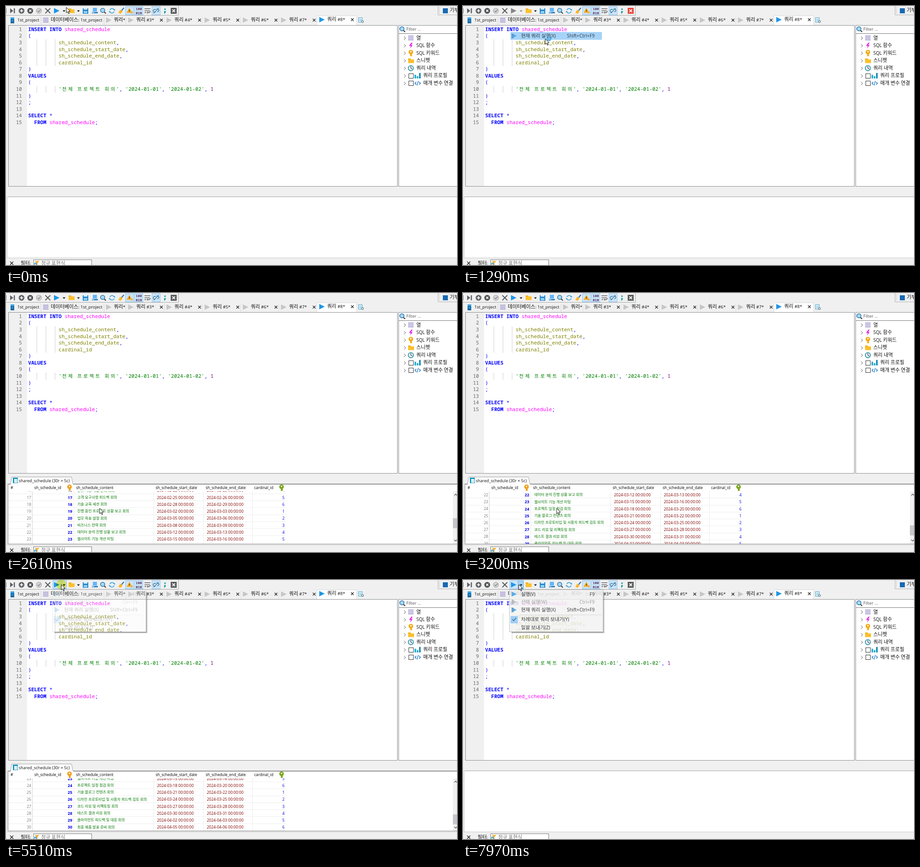
An HTML page with a canvas that plays this animation: 987 px wide and 568 px high, repeating every 8 s.

```html
<!DOCTYPE html>
<html lang="ko">
<head>
<meta charset="utf-8">
<title>SQL editor</title>
<style>
html, body { margin: 0; width: 100%; height: 100%; overflow: hidden; background: #f0f0f0; }
canvas { display: block; }
</style>
</head>
<body>
<canvas id="stage" width="987" height="568"></canvas>
<script>
const g = document.getElementById('stage').getContext('2d');
const LOOP = 8000;
const UI = '"Open Sans", "Noto Sans CJK KR", "Noto Sans CJK", sans-serif';
const HANGUL = '"Noto Sans CJK KR", "Noto Sans CJK", sans-serif';
const MONO = '"Noto Sans Mono", "DejaVu Sans Mono", monospace';
const BLUE = '#1e96e8', GRAY = '#5f6266', FACE = '#f0f0f0', YELLOW = '#fbc02d';

// ---------- drawing helpers ----------
function box(x, y, w, h, fill, stroke) {
  if (fill) { g.fillStyle = fill; g.fillRect(x, y, w, h); }
  if (stroke) { g.strokeStyle = stroke; g.lineWidth = 1; g.strokeRect(x + .5, y + .5, w - 1, h - 1); }
}
function trace(pts) {
  g.beginPath();
  for (let i = 0; i < pts.length; i += 2) g.lineTo(pts[i], pts[i + 1]);
}
function poly(pts, fill) { trace(pts); g.closePath(); g.fillStyle = fill; g.fill(); }
function line(pts, color, width = 1) {
  trace(pts); g.strokeStyle = color; g.lineWidth = width; g.stroke();
}
function disc(x, y, r, fill) { g.beginPath(); g.arc(x, y, r, 0, 7); g.fillStyle = fill; g.fill(); }
function ring(x, y, r, color, width, from = 0, to = 7) {
  g.beginPath(); g.arc(x, y, r, from, to); g.strokeStyle = color; g.lineWidth = width; g.stroke();
}
function cross(x, y, r, color, width) {
  line([x - r, y - r, x + r, y + r], color, width);
  line([x - r, y + r, x + r, y - r], color, width);
}
function play(x, y, color, r = 6) { poly([x - r, y - r, x + r, y, x - r, y + r], color); }
function drop(x, y, color) { poly([x - 3, y - 1.5, x + 3, y - 1.5, x, y + 2], color); }
function lens(x, y) {
  disc(x, y, 4.6, '#a9d8f5');
  ring(x, y, 4.6, '#2472a8', 1.5);
  line([x + 3.5, y + 3.5, x + 7, y + 7], '#333', 2);
}
function folder(x, y) {
  box(x - 6, y - 5, 6, 3, '#f5a800'); box(x - 6, y - 3, 13, 8, YELLOW);
}
function stack(x, y, color = '#b9b2dc') {
  for (let i = -1; i < 2; i++) box(x - 6, y + i * 4 - 1.5, 12, 3, color);
}
function key(x, y, color) {
  disc(x, y - 2, 5, color); box(x - 1.5, y, 4, 7, color);
  disc(x, y - 3, 1.6, '#fff');
}
// Hangul and Latin runs use slightly different sizes, as in the desktop UI.
function label(s, x, y, size = 9.5, color = '#111', align = 'left', ko = 10.9, weight = 400) {
  const runs = (s.match(/[가-힣]+|[^가-힣]+/g) || []).map(r =>
    [r, /[가-힣]/.test(r) ? `${weight} ${ko}px ${HANGUL}` : `${weight} ${size}px ${UI}`]);
  const width = ([r, f]) => { g.font = f; return g.measureText(r).width; };
  if (align === 'right') x -= runs.reduce((sum, r) => sum + width(r), 0);
  g.fillStyle = color;
  for (const r of runs) {
    const w = width(r);
    g.fillText(r[0], x, y + size * .36);
    x += w;
  }
}

// ---------- timing ----------
const clamp = v => Math.max(0, Math.min(1, v));
const ramp = (t, from, to) => clamp((t - from) / (to - from));
function track(keys, t, ease = v => v) {
  let a = keys[0];
  for (const b of keys) {
    if (b[0] > t) {
      const k = ease((t - a[0]) / (b[0] - a[0]));
      return a.slice(1).map((v, i) => v + (b[i + 1] - v) * k);
    }
    a = b;
  }
  return a.slice(1);
}
const smooth = v => v * v * (3 - 2 * v);
const pointer = [
  [0, 132, 3], [170, 132, 3], [250, 124, 11], [310, 125, 12], [490, 165, 81], [720, 165, 81],
  [990, 180, 72], [1600, 180, 72], [2010, 205, 472], [3640, 205, 472], [4140, 63, 33],
  [4400, 70, 32], [4460, 70, 32], [5240, 121, 10], [5680, 121, 10], [6000, 168, 68],
  [6270, 168, 68], [6490, 169, 249], [6710, 171, 256], [6890, 171, 256], [7670, 122, 9], [7700, 122, 10]
];
const scrolling = [[0, 0], [2040, 0], [2610, 238.5], [2680, 255], [2950, 255], [3260, 343]];
const menus = [[240, 1220], [5480, 6200], [7850, 9000]];
const runs = [1220, 6200];
const presses = [240, 1210, 5470, 6190, 7850];
const within = (t, a, b) => t >= a && t < b;

function stateAt(t) {
  const [x, y] = track(pointer, t, smooth);
  const run = runs.find(r => within(t, r, r + 520));
  const since = run === undefined ? -1 : t - run;
  const menu = menus.find(m => within(t, m[0], m[1]));
  const overPlay = x >= 102 && x < 132 && y < 21;
  return {
    x, y, since,
    menu: menu ? ramp(t, menu[0], menu[0] + 145) : 0,
    busy: within(since, 30, 200),
    press: presses.some(p => within(t, p, p + 75)),
    hot: !!menu || overPlay || within(since, 200, 480),
    rows: within(t, 1450, 6250),
    scroll: track(scrolling, Math.floor(t / 30) * 30)[0],
    caret: within(t, 1610, 5250) && Math.abs(Math.floor((t - 2130) / 520) % 2) === 1
  };
}

// ---------- toolbar ----------
function toolbar(s) {
  box(0, 0, 987, 42, FACE);
  line([0, 20.5, 377.5, 20.5, 377.5, 0], '#a8a8a8');
  box(0, 5, 1, 11, '#888');
  poly([9, 5, 16, 10.5, 9, 16], GRAY); box(17, 5, 2.5, 11, GRAY);
  disc(34, 10.5, 6.3, GRAY);
  line([30.5, 10.5, 37.5, 10.5], '#fff', 1.8); line([34, 7, 34, 14], '#fff', 1.8);
  disc(53, 10.5, 6.3, '#4c4f52'); cross(53, 10.5, 2.5, '#fff', 1.7);
  disc(72, 10.5, 6.3, '#a5a5a5'); disc(72, 10.5, 5.3, '#d6d6d6');
  line([69, 10.5, 71.5, 13, 75.5, 8], '#888', 1.6);
  cross(91.5, 10.5, 5.5, '#55585b', 2);

  if (s.hot) {
    box(102, 1, 31, 19, '#cce4f7', '#90c8f6');
    if (s.menu > .5) box(120, 1, 13, 19, '#a6d2f3', '#6cb3e8');
    else line([120.5, 1, 120.5, 20], '#90c8f6');
  }
  play(111, 10.5, s.busy ? '#858585' : BLUE);
  drop(127, 11, s.busy ? '#858585' : '#111');
  folder(143, 10.5); drop(158.5, 11, '#111');

  box(168, 5, 12, 12, '#2187c9'); box(170, 4, 8, 4, '#d6eefb'); box(170, 11, 8, 5, '#8fd0f3');
  box(190, 4, 9, 8, '#64b5f6'); box(188, 13, 13, 3, '#2d7fbd'); box(188, 12, 5, 3, '#9ad0f6');
  lens(211.5, 9.5);
  ring(232, 10.5, 5, '#259bdc', 1.5, .3, 2.8); ring(232, 10.5, 5, '#259bdc', 1.5, 3.5, 5.9);
  poly([225, 11, 229, 12, 226, 14.5], '#259bdc'); poly([239, 10, 235, 9, 238, 6.5], '#259bdc');
  line([258, 4, 253, 10], '#3b71a8', 2.4);
  poly([250, 8, 255, 12, 251, 17, 246, 15], '#f9b624');

  for (const x of [261, 281, 319]) box(x, 1, 19, 19, '#cce4f7', '#90c8f6');
  poly([270, 4, 276, 15, 264, 15], '#f6a91b'); box(269.4, 8, 1.4, 4, '#553b00');
  disc(275, 14, 2.6, '#e6b458');
  g.font = `bold 7.5px ${MONO}`; g.fillStyle = '#56305f';
  g.fillText('100', 284, 9); g.fillText('010', 284, 18);
  line([303, 6, 316, 6], GRAY, 1.5); line([303, 10.5, 314, 10.5], GRAY, 1.5);
  line([314, 10.5, 316, 12, 314, 14.5, 310, 14.5], GRAY, 1.3);
  poly([311, 12, 308, 14.5, 311, 17], GRAY); line([303, 14.5, 307, 14.5], GRAY, 1.5);
  ring(325.5, 10.5, 3.2, '#3c789d', 1.4, 1, 5.5); ring(331.5, 9.5, 3, '#3c789d', 1.4, 4, 8);
  line([323, 16, 334, 5], '#3c789d', 1.3);
  disc(348, 7, 1.8, '#14a0a8'); poly([346.3, 11, 349.8, 11, 349.5, 14, 347, 17, 346, 16], '#14a0a8');
  box(360.5, 4, 13, 13, s.busy ? '#e94335' : '#55585b'); cross(367, 10.5, 3, '#fff', 1.8);

  line([945.5, 0, 945.5, 19.5, 987, 19.5], '#b0b0b0');
  for (let y = 3; y < 18; y += 3) box(948, y, 1, 1, '#888');
  box(956, 5, 11, 11, '#1769b3');
  label('기부', 971, 10);
}

function tabs() {
  box(10, 25, 8, 13, '#176aa5'); box(10, 25, 8, 4, '#35a0e4'); box(12, 32, 4, 1, '#8bd0ff');
  label('1st_project', 25, 31, 9.4);
  stack(87, 31);
  label('데이터베이스: 1st_project', 98, 31, 9.4);
  for (const x of [76.5, 214.5]) line([x, 24, x, 41], '#d8d8d8');
  play(225, 31, '#c6c6c6'); label('쿼리*', 236, 31, 9.4);
  for (let n = 3; n < 9; n++) {
    const x = 268 + (n - 3) * 83.6, on = n === 8, y = on ? 30 : 31;
    if (on) { box(680, 21, 88, 22, '#fff'); line([680.5, 42, 680.5, 21.5, 767.5, 21.5, 767.5, 42], '#d9d9d9'); }
    else line([x - 5.5, 24, x - 5.5, 41], '#dedede');
    play(x + 5.5, y, on ? BLUE : '#c6c6c6');
    label(`쿼리 #${n}*`, x + 17, y, 9.4);
    cross(x + 72, y, 3, '#222', 1.2);
  }
  box(771, 25, 9, 11, '#eef8ff', '#4ba3c7');
  line([773, 29, 778, 29], '#4ba3c7'); line([773, 32, 778, 32], '#4ba3c7');
  disc(780, 34, 3, '#7a9ca8'); disc(780, 34, 1.2, '#fff');
}

// ---------- editor ----------
const KW = '#0000ff', TABLE = '#ff00ff', COL = '#808000', STR = '#008000', NUM = '#800080';
// Each entry: line, column, text, colour, bold
const code = [
  [1, 0, 'INSERT INTO', KW, 1], [1, 12, 'shared_schedule', TABLE], [2, 0, '(', KW],
  [3, 10, 'sh_schedule_content', COL], [3, 29, ',', KW],
  [4, 10, 'sh_schedule_start_date', COL], [4, 32, ',', KW],
  [5, 10, 'sh_schedule_end_date', COL], [5, 30, ',', KW],
  [6, 10, 'cardinal_id', COL], [7, 0, ')', KW], [8, 0, 'VALUES', KW, 1], [9, 0, '(', KW],
  [10, 10, "'전체 프로젝트 회의'", STR], [10, 30, ',', KW], [10, 32, "'2024-01-01'", STR], [10, 44, ',', KW],
  [10, 46, "'2024-01-02'", STR], [10, 58, ',', KW], [10, 60, '1', NUM],
  [11, 0, ')', KW], [12, 0, ';', KW], [14, 0, 'SELECT', KW, 1], [14, 7, '*', KW],
  [15, 2, 'FROM', KW, 1], [15, 7, 'shared_schedule', TABLE], [15, 22, ';', KW]
];
const CELL = 6.65, lineY = n => 51 + (n - 1) * 14.58;

function editor(s) {
  box(5, 42, 852, 354, '#fff', '#8a8d91');
  box(6, 43, 40, 352, FACE);
  for (let n = 1; n <= 15; n++) {
    g.font = `11.08px ${MONO}`; g.fillStyle = '#686868';
    g.fillText(n, 35 - String(n).length * CELL, lineY(n) + 3.8);
    if (within(n, 3, 7) || n === 10)
      for (const x of [67, 87, 107]) box(x, Math.round(lineY(n) - 7.5), 1, 15, '#d0d0d0');
  }
  for (const [n, col, text, color, bold] of code) {
    let x = 48.5 + col * CELL;
    g.fillStyle = color;
    if (!/[가-힣]/.test(text)) {
      g.font = `${bold ? 'bold ' : ''}11.08px ${MONO}`;
      g.fillText(text, x, lineY(n) + 3.8);
      continue;
    }
    for (const ch of text) {
      const wide = /[가-힣]/.test(ch);
      g.font = wide ? `10.6px ${HANGUL}` : `11.08px ${MONO}`;
      g.fillText(ch, x + (wide ? 1 : 0), lineY(n) + 3.8);
      x += wide ? CELL * 2 : CELL;
    }
  }
  if (s.caret) box(81, 234, 1.5, 13, '#000');
}

function sidebar() {
  box(859, 42, 129, 354, '#fff', '#8a8d91');
  line([860, 60.5, 987, 60.5], '#777');
  lens(866.5, 50);
  label('Filter ...', 876, 51, 9.5, '#555');
  ['열', 'SQL 함수', 'SQL 키워드', '스니펫', '쿼리 내역', '쿼리 프로필', '매개 변수 연결'].forEach((name, i) => {
    const y = 70 + i * 16.57, checked = i > 4;
    line([871, y - 3, 874.5, y + .5, 871, y + 4], '#8a8a8a', 1.1);
    label(name, checked ? 913 : 898, y, 10);
    if (checked) box(881, Math.round(y - 5), 11, 11, '#fff', '#333');
    if (i === 0) stack(886, y);
    if (i === 1) poly([887, y - 6, 882, y + 1, 886, y + 1, 884, y + 7, 890, y - 1, 886.5, y - 1, 890, y - 6], '#e321df');
    if (i === 2) key(886, y, '#f1ad18');
    if (i === 3) folder(886, y + .5);
    if (i === 4) { disc(886, y, 6, '#e8f7fd'); ring(886, y, 5.6, '#19839f', 1.5); line([886, y - 4, 886, y, 889, y + 2], '#333', 1.2); }
    if (i === 5) { box(894, y - 2, 3.5, 8, '#16acd0'); box(899, y + 1, 3.5, 5, '#16acd0'); box(904, y - 6, 3.5, 12, '#1789b5'); }
    if (i === 6) {
      line([898, y - 3, 895, y, 898, y + 3], '#1976c5', 1.5);
      line([902.5, y - 5, 899.5, y + 5], '#1976c5', 1.4);
      line([904, y - 3, 907, y, 904, y + 3], '#1976c5', 1.5);
    }
  });
}

// ---------- results ----------
const topics = [
  '전체 프로젝트 회의', '업무 분담 논의 회의', '요구사항 분석 회의', '디자인 시안 검토 회의', '데이터베이스 설계 회의',
  '개발 환경 설정 회의', '주간 업무 보고 회의', '기능 명세 검토 회의', '화면 설계 회의', '중간 점검 회의', '보안 점검 회의',
  '품질 관리 회의', '마케팅 전략 회의', '예산 검토 회의', '팀 협업 개선 회의', '신규 기능 개발 논의 회의',
  '고객 요구사항 피드백 회의', '기술 교육 세션 회의', '진행 중인 프로젝트 상황 보고 회의', '업무 목표 설정 회의',
  '비즈니스 전략 회의', '데이터 분석 진행 상황 보고 회의', '웹사이트 기능 개선 미팅', '프로젝트 일정 점검 회의',
  '기술 블로그 컨텐츠 회의', '디자인 프로토타입 및 사용자 피드백 검토 회의', '코드 리뷰 및 리팩토링 회의',
  '테스트 결과 리뷰 회의', '클라이언트 피드백 및 대응 회의', '최종 제품 발표 준비 회의'
];
const dateOf = day => new Date(Date.UTC(2024, 0, day)).toISOString().slice(0, 10) + ' 00:00:00';
const ROW = 15.25;

function results(s) {
  box(0, 396, 987, 172, FACE);
  box(2, 418, 986, 135, '#fff', '#c8c8c8');
  line([4, 418.5, 987, 418.5], '#a0a0a0');
  if (s.rows) {
    line([4.5, 550.5, 4.5, 419.5, 987, 419.5], '#858585');
    line([4.5, 550.5, 987, 550.5], '#858585');
    poly([10, 420, 12, 403, 144, 403, 147, 420], '#fff');
    line([10, 419, 12.5, 403.5, 143.5, 403.5, 146.5, 419], '#a0a0a0');
    box(15, 405, 11, 12, '#fff', '#168caf'); box(15, 405, 11, 3, '#159bc1'); box(15, 405, 3, 12, '#159bc1');
    line([18, 412.5, 26, 412.5], '#9ed0df'); line([22.5, 408, 22.5, 417], '#9ed0df');
    label('shared_schedule (30r × 5c)', 28, 412, 9);
    table(s.scroll);
  }
  cross(12.5, 564, 3.5, '#222', 1.4);
  label('필터:', 32, 564.5, 9.5);
  box(60, 556, 128, 16, '#fff', '#7a7a7a');
  poly([63, 559, 73, 559, 69, 564, 69, 568, 66, 568, 66, 563], '#f2b443');
  box(62, 563, 5, 5, '#2d9ccb'); box(63.5, 565, 2, 3, '#fff');
  label('정규 표현식', 77, 564.5, 9.5, '#707070');
}

function table(scroll) {
  const heads = [[10, '#'], [62, 'sh_schedule_id'], [153.5, 'sh_schedule_content'], [327.5, 'sh_schedule_start_date'],
    [437, 'sh_schedule_end_date'], [543, 'cardinal_id']];
  for (const [x, name] of heads) label(name, x, 427, 8.4, '#000', 'left', 8, 500);
  key(139, 427, '#f0a01c'); key(603, 427, '#7ba51b');
  g.save();
  g.beginPath(); g.rect(5, 435, 973, 115); g.clip();
  topics.forEach((topic, i) => {
    const y = 442.5 + i * ROW - scroll, n = i + 1;
    if (y < 425 || y > 560) return;
    const day = 8 + i * 3 + (n > 21 ? 1 : 0), days = n === 24 ? 2 : 1;
    box(5, Math.round(y + 7), 607, 1, '#efefef');
    label(String(n), 55, y + .5, 8.4, '#777', 'right');
    label(String(n), 145, y + .5, 8.7, '#0000e6', 'right', 8, 700);
    label(topic, 156, y, 8, '#007800', 'left', 8, 500);
    label(dateOf(day), 330.5, y + .5, 8.5, '#800000', 'left', 8, 500);
    label(dateOf(day + days), 439.5, y + .5, 8.5, '#800000', 'left', 8, 500);
    label(String(i % 6 + 1), 609.5, y + .5, 8.5, '#0000e6', 'right', 8, 500);
  });
  for (const x of [57, 148, 323, 432, 539]) box(x, 435, 1, 115, x === 57 ? '#d2d2d2' : '#ebebeb');
  g.restore();
  box(978, 435, 9, 115, FACE);
  line([981, 444, 984, 441, 987, 444], '#555', 1.3);
  line([981, 541, 984, 544, 987, 541], '#555', 1.3);
  box(978, 448 + scroll * 66 / 343, 9, 22, '#c6c6ca');
}

// ---------- menu ----------
const items = [
  [31, '실행(V)', 'F9'], [48, '선택 실행(W)', 'Ctrl+F9'], [65.5, '현재 쿼리 실행(X)', 'Shift+Ctrl+F9'],
  [86.5, '차례대로 쿼리 보내기(Y)', ''], [104, '일괄 보내기(Z)', '']
];
function menuItem(i, hot) {
  const [y, name, keys] = items[i], off = i === 1, color = off ? '#8b8b8b' : '#111';
  if (hot && !off) box(104, Math.round(y - 9), 200, 17, '#91c9f7');
  if (i === 3) { box(104, 79, 16, 16, '#90c8f6'); line([108, 86, 111, 89.5, 116, 83], '#174b78', 1.3); }
  if (i < 3) {
    play(112, y, off ? '#c0c0c0' : '#3b9eea', 5.5);
    if (i) for (let d = -4; d < 5; d += 4) box(106, y + d - .5, 5, 1.3, off ? '#999' : '#678');
  }
  label(name, 127, y, 10, color, 'left', 10.7);
  label(keys, 288, y, 10.1, color, 'right');
}
function menu(s) {
  if (s.menu) {
    // The drop shadow appears at once, the body fades in.
    line([106, 114.5, 307, 114.5, 307, 26], '#858585', 1.5);
    line([107, 116, 309, 116, 309, 27], 'rgba(0,0,0,.14)', 2);
    g.globalAlpha = s.menu;
    box(101, 21, 206, 93, '#f2f2f2', '#bebebe');
    line([125, 76.5, 304, 76.5], '#d2d2d2');
    items.forEach((item, i) => menuItem(i, s.x > 103 && s.x < 305 && Math.abs(s.y - item[0]) < 8.5));
  } else if (s.since >= 0) {
    g.globalAlpha = clamp(1 - s.since / 360);
    menuItem(2, true);
  }
  g.globalAlpha = 1;
}

function halo({ x, y }) {
  g.globalCompositeOperation = 'multiply';
  disc(x, y, 11, 'rgba(255,240,60,.75)');
  g.globalCompositeOperation = 'source-over';
}

function cursor({ x, y, menu, busy, since }) {
  const text = x > 46 && x < 856 && y > 42 && y < 395 && !menu && !(since >= 0 && since < 200);
  if (text) {
    line([x, y - 5, x, y + 6], '#111', 1.2);
    line([x - 2, y - 5.5, x + 2.5, y - 5.5], '#111'); line([x - 2, y + 6, x + 2.5, y + 6], '#111');
    return;
  }
  const shape = [0, 0, 0, 12, 2.8, 9.5, 4.8, 14, 6.6, 13.2, 4.7, 8.8, 8.4, 8.5];
  g.save();
  g.translate(x, y);
  poly(shape, '#fff');
  g.strokeStyle = '#111'; g.lineWidth = 1; g.stroke();
  g.restore();
  if (busy) { disc(x + 8, y, 4.8, '#2b8fd0'); ring(x + 8, y, 2.3, '#a9ddfa', 1.5); }
}

function draw(t) {
  const s = stateAt(t);
  toolbar(s); tabs(); editor(s); sidebar(); results(s); menu(s);
  if (s.press) halo(s);
  cursor(s);
}
const start = performance.now();
function frame() {
  draw((performance.now() - start) % LOOP);
  requestAnimationFrame(frame);
}
frame();
</script>
</body>
</html>
```
